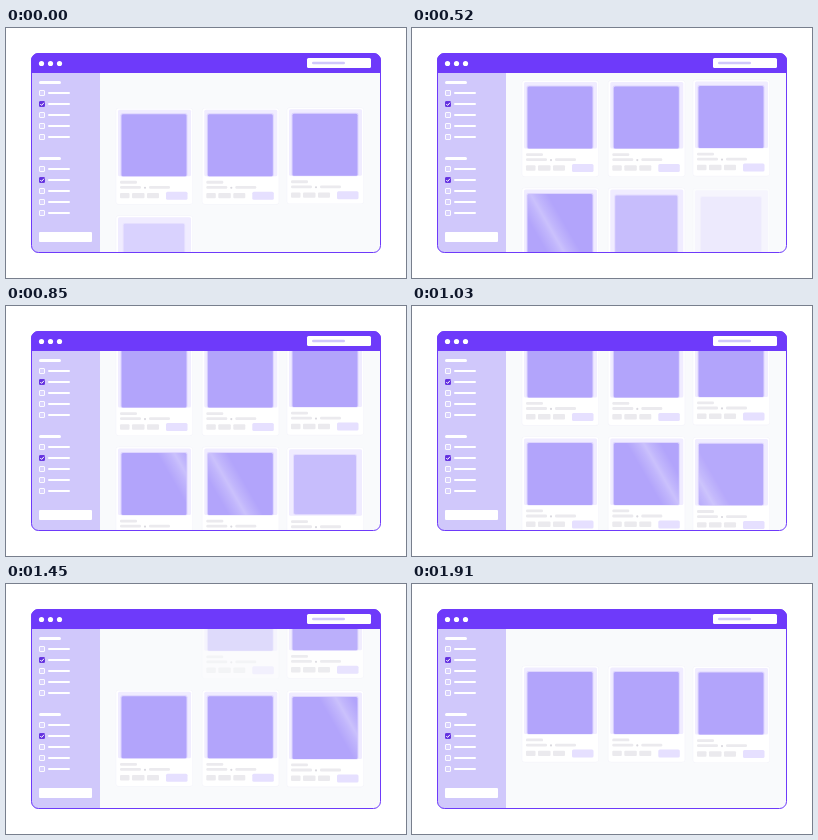
Animation, 400 px wide and 250 px high, one loop 1940 ms. Source, as an HTML page:

```html
<!DOCTYPE html>
<html lang="en">
<head>
<meta charset="utf-8">
<title>Scrolling catalogue</title>
<style>
html, body { margin: 0; width: 100%; height: 100%; overflow: hidden; background: #fff; }
svg { display: block; width: 400px; height: 250px; }
</style>
</head>
<body>
<svg id="stage" viewBox="0 0 400 250" xmlns="http://www.w3.org/2000/svg">
  <defs><clipPath id="view"><path d="M94 45H375V218a7 7 0 0 1-7 7H94z"/></clipPath></defs>
  <rect x="25" y="25" width="350" height="200" rx="7.5" fill="#f9fafc"/>
  <g id="cards" clip-path="url(#view)"></g>
  <path d="M25 45H94V225H32.5a7.5 7.5 0 0 1-7.5-7.5z" fill="#d0c8fb"/>
  <g id="sidebar"></g>
  <path d="M25 45V32.5a7.5 7.5 0 0 1 7.5-7.5H367.5a7.5 7.5 0 0 1 7.5 7.5V45z" fill="#6e3afa"/>
  <g id="header"></g>
  <rect x="25.5" y="25.5" width="349" height="199" rx="7" fill="none" stroke="#6e3afa"/>
</svg>
<script>
const LOOP = 1940;
const ROW_GAP = 107.5;
const COLUMNS = [0, 86.3, 171];
const STAGGER = 333;
const $ = id => document.getElementById(id);

function add(parent, tag, attrs) {
  const node = document.createElementNS('http://www.w3.org/2000/svg', tag);
  for (const key in attrs) node.setAttribute(key, attrs[key]);
  return parent.appendChild(node);
}
const rect = (parent, x, y, width, height, fill, rx = 0) =>
  add(parent, 'rect', { x, y, width, height, fill, rx });
const clamp = v => Math.max(0, Math.min(1, v));

function buildChrome() {
  const header = $('header'), side = $('sidebar');
  for (const cx of [35.5, 44.5, 53.5]) add(header, 'circle', { cx, cy: 35.5, r: 2.6, fill: '#fff' });
  rect(header, 301, 30, 64, 10, '#fff', 1.5);
  rect(header, 306, 33.8, 33, 2.5, '#d0c8fb', 1.2);

  for (const top of [53, 129]) {
    rect(side, 33, top, 22, 3, '#fff', 1.5);
    for (let i = 0; i < 5; i++) {
      const y = top + 12 + i * 11;
      const checked = i === 1;
      const box = rect(side, 33.5, y - 2.5, 5, 5, checked ? '#6330e0' : '#d8d1fc', 0.5);
      box.setAttribute('stroke', checked ? '#6330e0' : '#fff');
      box.setAttribute('stroke-width', 0.9);
      if (checked) add(side, 'path', { d: `M34.3 ${y}l1.3 1.4 2.4-2.7`, fill: 'none', stroke: '#fff' });
      rect(side, 42, y - 1, 22, 2, '#fff', 1);
    }
  }
  rect(side, 33, 204, 53, 10, '#fff', 1);
}

// Card coordinates have the full-size picture at 0,0 with size 65 x 62.
function buildCard(column, id) {
  const root = add($('cards'), 'g', {});
  const body = add(root, 'g', {});
  rect(body, -6, -6.5, 77.5, 97, '#f6f6fb', 3);
  rect(body, -5.2, -5.8, 76, 95.5, '#fff', 2.5);
  rect(body, -3.5, -4.5, 73, 66.5, '#f0ecff', 1.5);
  const grey = '#ebeaee';
  rect(body, -1.5, 66.6, 17, 2.8, grey, 1.2);
  rect(body, -1.5, 71.7, 21, 2.8, grey, 1.2);
  add(body, 'circle', { cx: 23.5, cy: 73.5, r: 1.1, fill: '#d9d8de' });
  rect(body, 27.5, 71.7, 21, 2.8, grey, 1.2);
  for (const [x, w] of [[-1.5, 9.5], [10.5, 12.5], [25.5, 12]]) rect(body, x, 78.7, w, 5.4, grey, 1);
  rect(body, 44.5, 77.5, 21.5, 8, '#e6e0ff', 1.5);

  const picture = add(root, 'g', {});
  rect(picture, -1, -1, 67, 63.5, '#b2a4fb', 2).setAttribute('opacity', 0.3);
  rect(picture, 0, 0, 65, 62, '#b2a4fb', 1.5);

  const gradient = add($('stage').querySelector('defs'), 'linearGradient', {
    id, gradientUnits: 'userSpaceOnUse', x1: -13, y1: 7.5, x2: 13, y2: -7.5
  });
  for (const [offset, alpha] of [[0, 0], [0.35, 0.2], [0.5, 0.32], [0.65, 0.2], [1, 0]])
    add(gradient, 'stop', { offset, 'stop-color': '#fff', 'stop-opacity': alpha });
  const shine = rect(picture, 0, 0, 65, 62, `url(#${id})`, 1.5);
  return { root, body, picture, gradient, shine, column };
}

const SCROLL = [[0, 0], [300, 16.5], [520, 27.7], [850, 46.7], [1210, 67],
  [1450, 81.5], [1519, 81.5], [1520, 83.4], [LOOP, ROW_GAP]];

function scrollAt(t) {
  const i = SCROLL.findIndex(([time]) => time > t);
  const [t0, y0] = SCROLL[i - 1], [t1, y1] = SCROLL[i];
  return y0 + (y1 - y0) * (t - t0) / (t1 - t0);
}

function place(card, y) {
  card.root.setAttribute('transform', `translate(${115.5 + COLUMNS[card.column]} ${y})`);
}

function drawLeaving(card, y, t) {
  place(card, y - (card.column === 2 ? 0.5 : 0));
  card.root.setAttribute('opacity', 1 - clamp((t - 1110 - card.column * 150) / 300));
  card.shine.setAttribute('opacity', 0);
}

function drawEntering(card, y, t) {
  const age = t + 230 - card.column * STAGGER;
  const p = clamp(age / 640);
  const scale = 0.923 + 0.077 * p * p;
  place(card, y + (card.column === 2 ? 0.6 : 0));
  card.body.setAttribute('opacity', clamp(age / 230));
  card.picture.setAttribute('opacity', p);
  card.picture.setAttribute('transform', `translate(32.5 31) scale(${scale}) translate(-32.5 -31)`);
  const sweep = (age - 750) * 0.13 + 2.4;
  card.gradient.setAttribute('gradientTransform', `translate(${sweep * 0.87} ${-sweep * 0.5})`);
  card.shine.setAttribute('opacity', sweep > -50 && sweep < 75 ? 1 : 0);
}

buildChrome();
const leaving = COLUMNS.map((_, i) => buildCard(i, 'shineA' + i));
const entering = COLUMNS.map((_, i) => buildCard(i, 'shineB' + i));

function render(t) {
  const y = 86.3 - scrollAt(t);
  leaving.forEach(card => drawLeaving(card, y, t));
  entering.forEach(card => drawEntering(card, y + ROW_GAP, t));
}

const start = performance.now();
function tick() {
  render((performance.now() - start) % LOOP);
  requestAnimationFrame(tick);
}
render(0);
requestAnimationFrame(tick);
</script>
</body>
</html>
```
